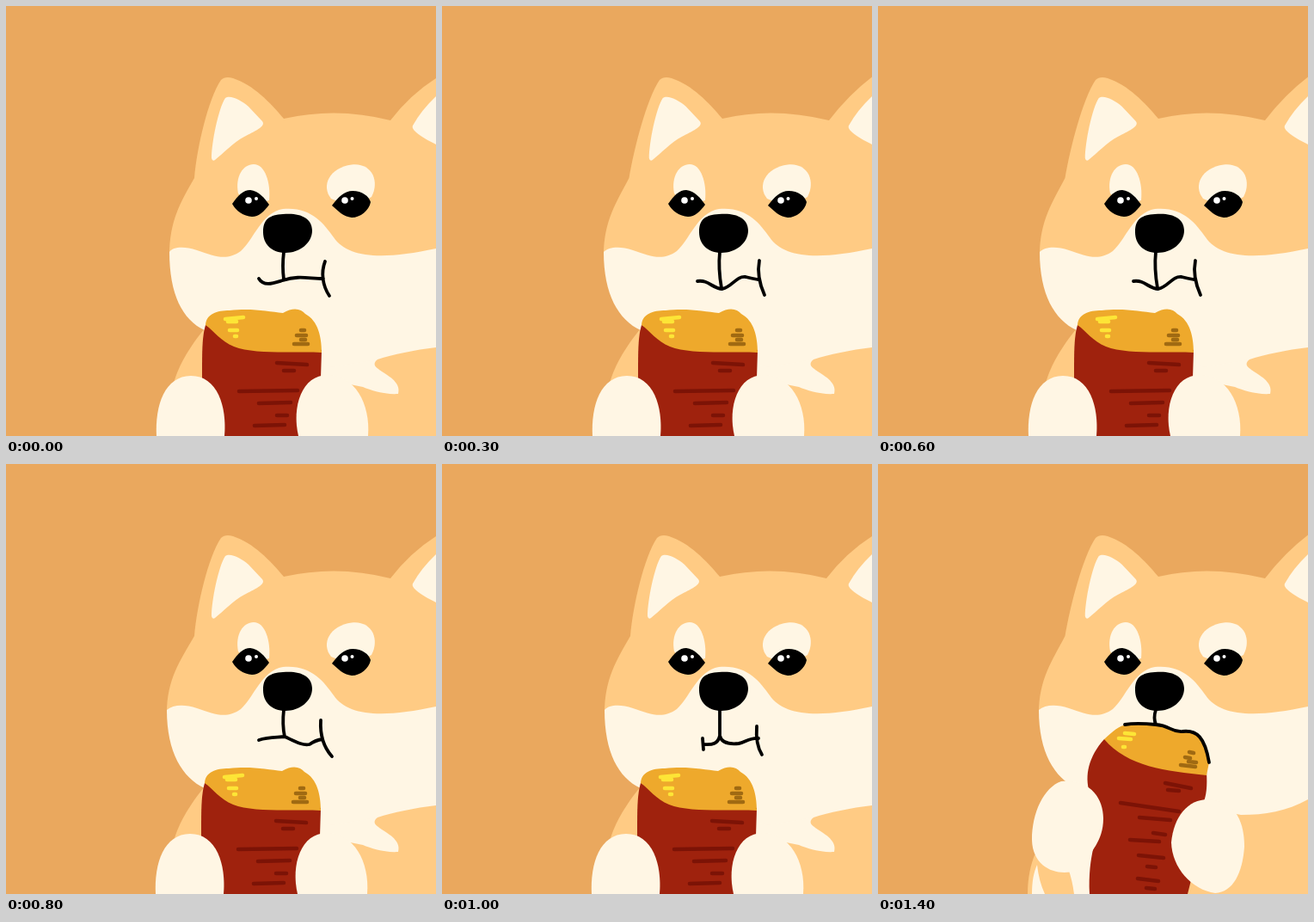
These frames come from a looping animation (500x500 px, 1.6 s). An HTML page:

```html
<!DOCTYPE html>
<html lang="en">
<head>
<meta charset="utf-8">
<title>Snacking dog</title>
<style>
html, body { margin: 0; width: 100%; height: 100%; overflow: hidden; background: #eaa85e; }
svg { display: block; width: 100%; height: 100%; }
.fur { fill: #ffcb84; }
.cream { fill: #fff6e4; }
.skin { fill: #9f220d; }
.flesh { fill: #eea92c; }
.ink, .mark { fill: none; stroke: #000; stroke-width: 3.8; stroke-linecap: round; stroke-linejoin: round; }
.mark { stroke-width: 4.6; }
.dark { stroke: #7c1306; }
.shine { stroke: #fde536; }
.brown { stroke: #a06a12; }
</style>
</head>
<body>
<svg viewBox="0 0 500 500">
  <rect width="500" height="500" fill="#eaa85e"/>

  <g class="hold">
    <path class="fur" d="M235 370C210 400 199 422 194 442L190 500H500V380Z"/>
    <path class="cream" d="M231 377L250 360H440L432 411C425 417 430 420 437 425C450 433 459 440 456 451C440 452 425 447 415 443L400 440V500H240V377Z"/>
  </g>
  <g class="bite">
    <path class="fur" d="M174 500C174 480 178 465 182 455L260 380H500V500Z"/>
    <path class="cream" d="M179 500C179 485 181 475 185 466Q187 485 194 500ZM228 500Q226 484 221 470L250 440V500Z"/>
  </g>

  <path id="fur" class="fur"/>
  <path id="face" class="cream"/>
  <path id="ear" class="cream" d="M239 178C239 160 247 120 255 108C261 104 274 111 282 118L298 135C303 141 288 147 277 153C264 160 253 172 243 180Q240 182 239 178Z"/>
  <path class="cream" d="M500 105Q483 121 473 139C470 145 488 155 500 161Z"/>

  <path class="cream" d="M270 218C266 198 276 184 288 184C301 184 308 205 306 226L285 232Z"/>
  <path class="cream" d="M378 224C366 209 376 188 402 184.500C425 182 435 203 425 222L402 234Z"/>
  <path d="M263 230C270 220 276 214 284 214C294 215 300 223 306 231C300 239 294 245 286 245C276 244 268 239 263 230Z"/>
  <path d="M379 232C386 222 394 215 403 215C414 215 422 221 424 228C422 238 412 246 402 246C392 245 386 238 379 232Z"/>
  <g fill="#fff">
    <circle cx="282" cy="226" r="3.8"/><circle cx="291" cy="224" r="2"/>
    <circle cx="394" cy="226" r="3.8"/><circle cx="402.500" cy="224" r="2"/>
  </g>
  <path d="M299 263C299 248 306 243 322 242C341 240 356 246 356 261C356 276 341 287 325 287C309 287 299 277 299 263Z"/>

  <g class="hold" id="snack">
    <path class="skin" d="M232 371C228 385 228 400 228 432L240 500H350L366 432L367 400L300 385Z"/>
    <path class="flesh" d="M232 371C233 358 245 354 260 354C285 351 305 355 322 357C334 350 343 352 348 358C363 366 367 385 367 403C340 401 290 406 265 396C250 390 242 378 232 371Z"/>
    <path class="mark dark" d="M315 415L350 417M323 424H335M271 448L339 447M294 462L331 461M315 476H327M289 488L324 487"/>
    <path class="mark shine" d="M255 364L276 362M258 367H268M260 377H269M266 384H268"/>
    <path class="mark brown" d="M343 377H347M338 383H349M343 388H348M335 393H351"/>
    <path class="cream" d="M175 500C173 464 185 430 215 430C246 430 257 466 254 500Z"/>
    <path class="cream" d="M340 500C332 466 344 429 374 429C405 429 424 462 421 500Z"/>
  </g>

  <g class="bite">
    <path class="skin" d="M263 320C245 340 240 362 246 382L262 412C255 430 244 455 246 500H360L365 480L378 395C382 385 383 375 382 358Z"/>
    <path class="flesh" d="M263 320C273 311 280 304 290 303L323 303C340 304 340 312 354 311C371 309 380 318 385 347L382 362C335 357 290 352 263 320Z"/>
    <path class="mark dark" d="M334 371L364 377M337 379L350 380M282 394L350 404M304 411L340 414M320 429L334 431M293 437L327 439M303 455L332 458M313 468L323 469M302 482L326 485M312 493L322 494"/>
    <path class="mark shine" d="M287 313L298 314M280 319L294 320M285 329H287"/>
    <path class="mark brown" d="M362 335L367 336M357 341L363 342M361 346L370 347M352 350L369 352"/>
    <path class="cream" d="M179 437C179 405 193 376 213 369C246 366 262 388 262 412C262 440 246 450 240 467C224 482 180 478 179 437Z"/>
    <path class="cream" d="M341 440C344 410 360 390 384 390C418 391 426 420 426 445C424 475 413 498 392 499C365 495 342 470 341 440Z"/>
  </g>

  <g id="smile">
    <path d="M308 312Q318 312 323 306Q338 315 362 313C363 335 351 348 335 348C318 348 311 335 308 312Z"/>
    <path fill="#ff6a57" d="M317 326C320 317 331 317 337 324C343 315 357 316 358 324C357 338 348 345 336 345C324 345 318 336 317 326Z"/>
  </g>
  <path id="mouth" class="ink"/>
</svg>
<script>
const $ = id => document.getElementById(id);

// ear: ear shift, cheek: left edge of the head, shift: offset of snack and paws
const poses = {
  rest: { ear: 0, cheek: 190, shift: 0,
    mouth: "M323 286Q321 303 323 318M294 317C300 327 312 322 322 319C340 313 352 317 369 317M371 297C366 310 368 325 376 337" },
  low: { ear: 3, cheek: 188, shift: 0,
    mouth: "M323 286Q321 305 325 328M297 320C310 318 315 329 326 329C338 326 342 314 353 315Q361 317 367 318M369 296C366 312 370 325 375 336" },
  right: { ear: 0, cheek: 187, shift: -1,
    mouth: "M323 286Q321 303 324 317M294 321C305 317 315 318 324 317C335 322 345 328 353 326Q360 321 368 320M366 298C365 315 370 330 379 340" },
  left: { ear: 0, cheek: 189, shift: -1,
    mouth: "M323 286V316M303 319L304 332M304 326C315 327 321 325 323 316C325 325 335 326 345 325C352 324 358 318 368 319M366 305C365 318 367 330 372 338" },
  smile: { ear: 0, cheek: 187, shift: -1,
    mouth: "M323 286V306M295 299C299 313 315 316 323 306C340 318 369 316 379 300" },
  bite: { ear: 3, cheek: 187, shift: 0,
    mouth: "M323 286Q320 295 323 303M287 303C300 301 312 302 323 303C340 304 340 312 354 311C371 309 380 318 385 347" }
};
const chew = ["right", "low", "left"];

function poseAt(t) {
  if (t < 200) return "rest";
  if (t < 1200) return chew[Math.floor((t - 200) / 100) % 3];
  return t < 1400 ? "smile" : "bite";
}

function show(selector, on) {
  for (const el of document.querySelectorAll(selector)) el.style.display = on ? "" : "none";
}

function draw(name) {
  const { ear: e, cheek: c, shift, mouth } = poses[name];
  const biting = name === "bite";
  $("fur").setAttribute("d", `M${c} 290C${c} 250 203 228 ${219 - e / 2} 200
    C${222 + e / 2} 165 ${235 + e} 108 ${250 + e} 86Q${255 + e} 81 ${264 + e} 84C${288 + e} 92 ${307 + e} 112 ${323 + e} 131
    Q385 117 ${447 + e} 133Q${470 + e} 103 500 ${84 - e / 2}V310H230Z`);
  const chin = biting ? "500 390C475 404 450 408 422 408L380 400" : "500 397C475 400 450 405 432 411L380 420";
  $("face").setAttribute("d", `M${c} 286C194 280 207 279 222 284C243 291 256 297 273 285
    C288 272 297 240 322 236C354 233 369 252 381 269C398 294 440 295 500 282
    L${chin}L250 395L231 377C205 365 ${c} 335 ${c} 286Z`);
  $("ear").setAttribute("transform", `translate(${e * 0.6} -1)`);
  $("snack").setAttribute("transform", `translate(${shift} 0)`);
  $("mouth").setAttribute("d", mouth);
  show(".hold", !biting);
  show(".bite", biting);
  show("#smile", name === "smile");
}

let current;
const start = performance.now();
function frame(now) {
  const name = poseAt(Math.max(0, now - start) % 1600);
  if (name !== current) draw(current = name);
  requestAnimationFrame(frame);
}
frame(start);
</script>
</body>
</html>
```
